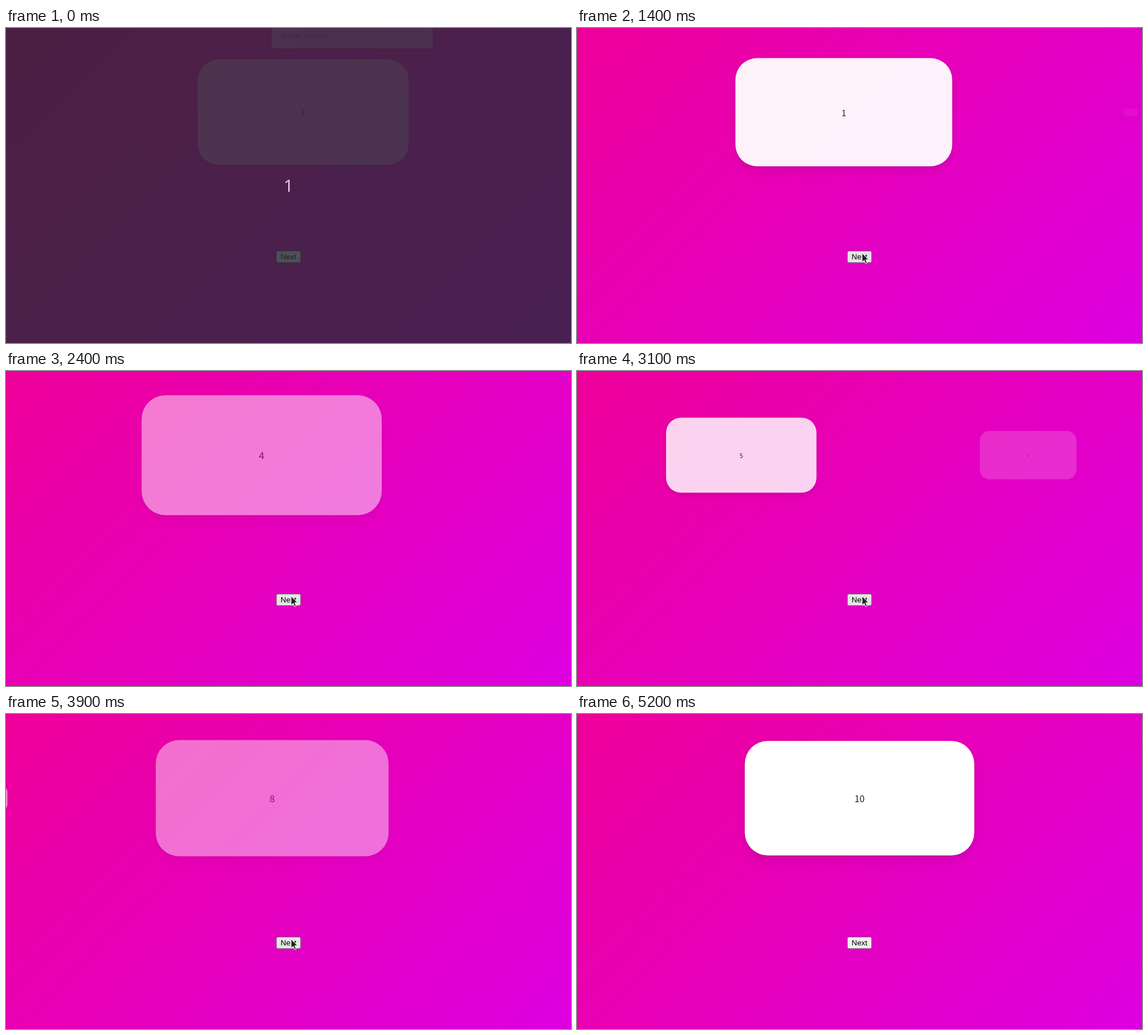
Animation of 985 by 550 pixels, one loop 5.4 s. Source, as an HTML page:

```html
<!DOCTYPE html>
<html lang="en">
<head>
<meta charset="utf-8">
<title>Springy cards</title>
<style>
  html, body { margin: 0; width: 100%; height: 100%; overflow: hidden; }
  body { position: relative; background: linear-gradient(135deg, #e09, #dd00e0); }
  body * { position: absolute; box-sizing: border-box; }
  .card {
    left: 292.5px; top: 47px; width: 400px; height: 200px; border-radius: 40px;
    background: #fff; color: #222; text-align: center;
    font: 300 16px/200px "Noto Sans CJK JP", "Noto Sans CJK", "Noto Sans", sans-serif;
    box-shadow: 0 1px 3px rgba(0,0,0,.2), 0 10px 20px rgba(0,0,0,.07);
  }
  #popup {
    left: 458px; top: -20px; width: 291px; height: 57px; border-radius: 4px;
    background: #f0f0f0; color: #5f6368; transform-origin: 50% 20px;
    box-shadow: 0 1px 4px rgba(0,0,0,.4);
    font: 12px/16px Lato, sans-serif;
  }
  #popup * { top: 26px; }
  #popup b { left: 16px; font-weight: 600; }
  #popup span { left: 58px; }
  #next {
    left: 471px; top: 389px; width: 43px; height: 21px; padding: 0;
    border: 1px solid #767676; border-radius: 3px; color: #000; text-align: center;
    font: 13.333px/19px "Liberation Sans", Arial, sans-serif;
  }
  #cursor { left: 0; top: 0; overflow: visible; }
  #fade {
    inset: 0; background: rgb(37,41,48); color: #fff; text-align: center;
    font: 30px/550px "Open Sans", "Noto Sans", sans-serif;
  }
</style>
</head>
<body>
<div class="card" id="leaving"></div>
<div class="card" id="current"></div>
<div id="popup"><b>Bramio</b><span>Translate</span></div>
<div id="next">Next</div>
<svg id="cursor" width="14" height="21">
  <path d="M0 0V16L3.7 12.6 6.2 18.4 8.8 17.3 6.4 11.6H11.2Z" fill="#222" stroke="#fff"/>
</svg>
<div id="fade">1</div>
<script>
const LOOP = 5400, STEP = 100, TRAVEL = 500;
// moments at which cards 1 to 10 come in
const starts = [-108, 1384, 1850, 2257, 2660, 3048, 3432, 3770, 4258, 4632];
// cursor stops: time, x, y
const stops = [
  [500, 748, -1], [800, 685, 140], [900, 596, 348], [1100, 582, 378],
  [1300, 497, 393], [4700, 440, 330], [4800, 114, 19]
];
const $ = id => document.getElementById(id);
const clamp = v => Math.max(0, Math.min(1, v));

// remaining distance of an underdamped spring going from 1 to 0
function spring(t, stiffness, damping) {
  const decay = damping / 2, w = Math.sqrt(stiffness - decay * decay);
  return Math.exp(-decay * t) * (Math.cos(w * t) + decay / w * Math.sin(w * t));
}

// the same for critical damping
function settle(t, stiffness) {
  const wt = Math.sqrt(stiffness) * t;
  return (1 + wt) * Math.exp(-wt);
}

function pose(el, label, x, scale, opacity) {
  el.textContent = label;
  el.style.transform = `translateX(${x}px) scale(${scale})`;
  el.style.opacity = clamp(opacity);
}

function drawCards(ms) {
  const i = starts.findLastIndex(s => s <= ms);
  const t = (ms - starts[i]) / 1000;
  const x = spring(t, 500, 25), shown = t / .3;
  pose($("current"), i + 1, TRAVEL * x, 1 - spring(t, 550, 30), shown);
  pose($("leaving"), i || "", TRAVEL * (x - 1), settle(t, 550), i ? 1 - shown : 0);
}

function drawPointer(ms) {
  const stop = stops.findLast(s => s[0] <= ms);
  const visible = stop && ms < 4900;
  $("cursor").style.display = visible ? "" : "none";
  if (visible) $("cursor").style.transform = `translate(${stop[1]}px, ${stop[2]}px)`;

  const over = ms >= 1300 && ms < 4700;
  const pressed = over && starts.some(s => ms < s && ms >= s - 70);
  $("next").style.background = pressed ? "#f5f5f5" : over ? "#e5e5e5" : "#efefef";
}

function drawIntro(ms) {
  const open = clamp(.36 + ms / 300);
  $("popup").style.opacity = ms < 1300 ? open : 0;
  $("popup").style.transform = `scale(${.947 + .053 * open})`;
  $("fade").style.opacity = .8 * clamp(1 - ms / 400);
}

function frame() {
  const ms = Math.floor(performance.now() % LOOP / STEP) * STEP;
  drawCards(ms);
  drawPointer(ms);
  drawIntro(ms);
  requestAnimationFrame(frame);
}
frame();
</script>
</body>
</html>
```
